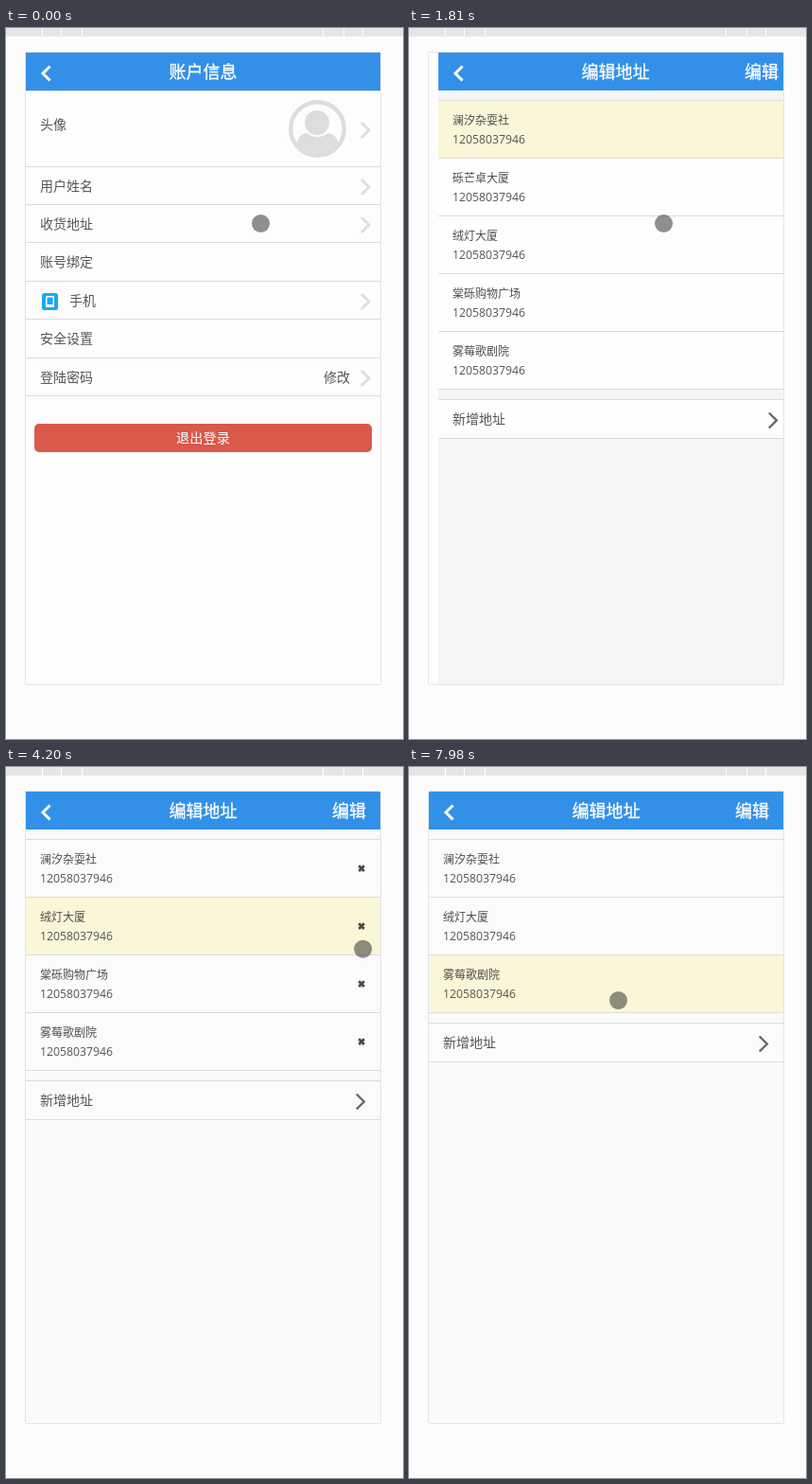
Animation of 420 by 751 pixels, one loop 8 s. Source, as an HTML page:

```html
<!DOCTYPE html>
<html lang="zh-CN">
<head>
<meta charset="utf-8">
<title>编辑地址</title>
<style>
  html, body { margin: 0; width: 100%; height: 100%; overflow: hidden; background: #fcfcfc; }
  svg { display: block; width: 100%; height: 100%; }
  text { font-family: "Noto Sans CJK SC", "Noto Sans CJK", sans-serif; white-space: pre; }
  .num { font-family: "Open Sans", "Noto Sans", sans-serif; }
  .title { stroke: #fff; stroke-width: .3; }
</style>
</head>
<body>
<svg id="stage" viewBox="0 0 420 751">
  <defs>
    <clipPath id="screen"><rect x="21" y="26" width="375" height="667"/></clipPath>
    <clipPath id="face"><circle cx="329.5" cy="106.5" r="28"/></clipPath>
  </defs>
</svg>
<script>
const LOOP = 8000;
const TICK = 120;
const LEFT = 21, WIDTH = 375, MIDDLE = 208.5;
const BLUE = '#3290e8';
const stage = document.getElementById('stage');

function add(parent, tag, attrs, content) {
  const el = document.createElementNS('http://www.w3.org/2000/svg', tag);
  for (const k in attrs) el.setAttribute(k, attrs[k]);
  if (content) el.textContent = content;
  parent.appendChild(el);
  return el;
}
const group = (p, attrs) => add(p, 'g', attrs);
const rect = (p, x, y, width, height, fill, rx = 0) => add(p, 'rect', { x, y, width, height, fill, rx });
const band = (p, y, height, fill) => rect(p, LEFT, y, WIDTH, height, fill);
const rule = (p, y) => band(p, y, 1, '#dcdcdc');
const circle = (p, cx, cy, r, fill) => add(p, 'circle', { cx, cy, r, fill });
const ring = (p, cx, cy, r, color, width) =>
  add(p, 'circle', { cx, cy, r, fill: 'none', stroke: color, 'stroke-width': width });
const line = (p, d, color, width) =>
  add(p, 'path', { d, fill: 'none', stroke: color, 'stroke-width': width });
const show = (el, on) => { el.style.display = on ? '' : 'none'; };

// y is the vertical middle of the line
function label(p, str, x, y, size, fill, anchor = 'start', style = '') {
  return add(p, 'text', { x, y: y + size * 0.37, 'font-size': size, fill, 'text-anchor': anchor, class: style }, str);
}
const chevron = (p, x, y, color, width) => line(p, `M${x} ${y - 8}l8 8l-8 8`, color, width);

function header(p, title, action = '') {
  band(p, 26, 40, BLUE);
  line(p, 'M46.5 40.5l-7.5 7.5l7.5 7.5', '#fff', 3);
  label(p, title, MIDDLE, 46.5, 18, '#fff', 'middle', 'title');
  label(p, action, 345, 46.5, 18, '#fff', 'start', 'title');
}

// Fixed surroundings
rect(stage, 0, 0, 420, 751, '#fcfcfc');
rect(stage, 0, 0, 420, 9, '#e5e5e5');
for (const x of [38, 58, 80, 335, 357, 377]) rect(stage, x, 0, 1, 9, '#fff');
const screen = group(stage, { 'clip-path': 'url(#screen)' });
band(screen, 26, 667, '#fdfdfd');
add(stage, 'rect', { x: 20.5, y: 25.5, width: 376, height: 668, rx: 1, fill: 'none', stroke: '#e4e4e4' });

// Account page
function accountPage() {
  const page = group(screen);
  const pale = '#e0dcdc', ink = '#555', sky = '#1ba8f5';
  header(page, '账户信息');
  rule(page, 66);
  label(page, '头像', 36, 102, 14, ink);
  chevron(page, 376, 108, pale, 2.8);

  const rowTop = i => Math.round(145.6 + 40.4 * i);
  ['用户姓名', '收货地址', '账号绑定', '手机', '安全设置', '登陆密码'].forEach((name, i) => {
    const y = rowTop(i), isPhone = name === '手机';
    const isHeading = name === '账号绑定' || name === '安全设置';
    rule(page, y);
    label(page, name, isPhone ? 67 : 36, y + 21, 14, ink);
    if (!isHeading) chevron(page, 376, y + 22, pale, 2.8);
    if (isPhone) {
      rect(page, 38, y + 13, 17, 18, sky, 2.5);
      rect(page, 42, y + 16, 9, 12, '#fff', 1);
      rect(page, 43.5, y + 17.5, 6, 7.5, sky);
    }
  });
  label(page, '修改', 336, rowTop(5) + 21, 14, ink);
  rule(page, rowTop(6));

  const face = group(page, { 'clip-path': 'url(#face)' });
  add(face, 'path', { d: 'M307 140V124Q309 112 318 111Q329.5 119 341 111Q350 112 352 124V140Z', fill: '#ddd' });
  circle(face, 329, 100, 14.5, '#fdfdfd');
  circle(face, 329, 100, 13, '#ddd');
  ring(page, 329.5, 106.5, 28.3, '#ddd', 4.4);

  rect(page, 30, 418, 357, 30, '#d9594a', 5);
  label(page, '退出登录', MIDDLE, 433, 14.2, '#fff', 'middle');
  return page;
}
const account = accountPage();

// Address page: each removal selects the next row down
const places = ['澜汐杂耍社', '砾芒卓大厦', '绒灯大厦', '棠砾购物广场', '雾莓歌剧院'];
const phone = '12058037946';
const removals = [{ at: 4200, name: places[1] }, { at: 4830, name: places[3] }];

const page = group(screen);
const pageBack = band(page, 26, 667, '#f5f5f5');
header(page, '编辑地址', '编辑');

function addressList(names, selected) {
  const root = group(page), backs = group(root), marks = group(root);
  const end = 76 + 61 * names.length;
  band(backs, 76, end - 76, 'inherit');
  band(backs, end + 11, 41, 'inherit');
  for (const back of backs.children) back.removeAttribute('fill');

  names.forEach((name, i) => {
    const y = 76 + 61 * i;
    if (i === selected) band(root, y, 61, '#faf6d8');
    rule(root, y);
    label(root, name, 36, y + 21.3, 12, '#4c4c4c');
    label(root, phone, 36, y + 41.5, 12.25, '#555', 'start', 'num');
    line(marks, `M373.3 ${y + 28.3}l5.6 5.6m0 -5.6l-5.6 5.6`, '#484848', 2.8);
  });
  for (const y of [end, end + 11, end + 52]) rule(root, y);
  label(root, '新增地址', 36, end + 32, 14, '#555');
  chevron(root, 370.8, end + 33.5, '#666', 2.4);
  root.appendChild(marks);
  return { root, backs, marks };
}
const lists = [...removals.keys(), removals.length].map(n => {
  const gone = removals.slice(0, n).map(r => r.name);
  return addressList(places.filter(p => !gone.includes(p)), n);
});

// Pointer
const pointer = group(stage);
const dot = circle(pointer, 0, 0, 9.5, 'rgba(0,0,0,.435)');
const press = group(pointer);
circle(press, 0, 0, 10, 'rgba(0,0,0,.5)');
ring(press, 0, 0, 10.5, 'rgba(160,180,198,.7)', 2);

const linear = p => p;
const smooth = p => p * p * (3 - 2 * p);
const easeIn = p => p ** 3;
const easeOut = p => 1 - (1 - p) ** 2;
const mix = (a, b, p) => a + (b - a) * p;

const home = { x: 269.5, y: 206.5 };
const moves = [
  { at: 2310, ticks: 4, x: 361, y: 57, ease: easeIn },
  { at: 3340, ticks: 5, x: 377.5, y: 169.5, ease: smooth },
  { at: 4200, ticks: 4, x: 378.5, y: 221.5, ease: easeOut },
  { at: 5450, ticks: 4, x: 370.5, y: 50.5, ease: linear },
  { at: 7980, ticks: 1, x: 221.5, y: 246.5, ease: linear },
];
const presses = [[2810, 3340], [5810, 7980]];

function pointerAt(t) {
  let { x, y } = home;
  for (const m of moves) {
    if (t < m.at) break;
    const p = Math.min(1, (Math.floor((t - m.at) / TICK) + 1) / m.ticks);
    x = mix(x, m.x, smooth(p));
    y = mix(y, m.y, m.ease(p));
  }
  return [x, y];
}

function render(t) {
  const opened = t >= 1420, settled = t >= 1930;
  show(account, !opened);
  show(page, opened);

  // The new page slides in from the right while fading up
  const n = Math.min(4, Math.max(0, Math.floor((t - 1450) / TICK)));
  page.setAttribute('transform', `translate(${70 * (1 - n / 4) ** 1.4} 0)`);
  page.setAttribute('opacity', Math.min(1, 0.09 + 0.31 * n));

  pageBack.setAttribute('fill', settled ? '#fafafa' : '#f5f5f5');
  const removed = removals.filter(r => t >= r.at).length;
  lists.forEach((list, i) => {
    show(list.root, i === removed);
    show(list.marks, t >= 3090 && t < 7600);
    list.backs.setAttribute('fill', settled ? '#fbfbfb' : '#fefefe');
  });

  pointer.setAttribute('transform', `translate(${pointerAt(t)})`);
  const pressed = presses.some(([from, to]) => t >= from && t < to);
  show(dot, !pressed);
  show(press, pressed);
}

const start = performance.now();
function tick() {
  render((performance.now() - start) % LOOP);
  requestAnimationFrame(tick);
}
tick();
</script>
</body>
</html>
```
